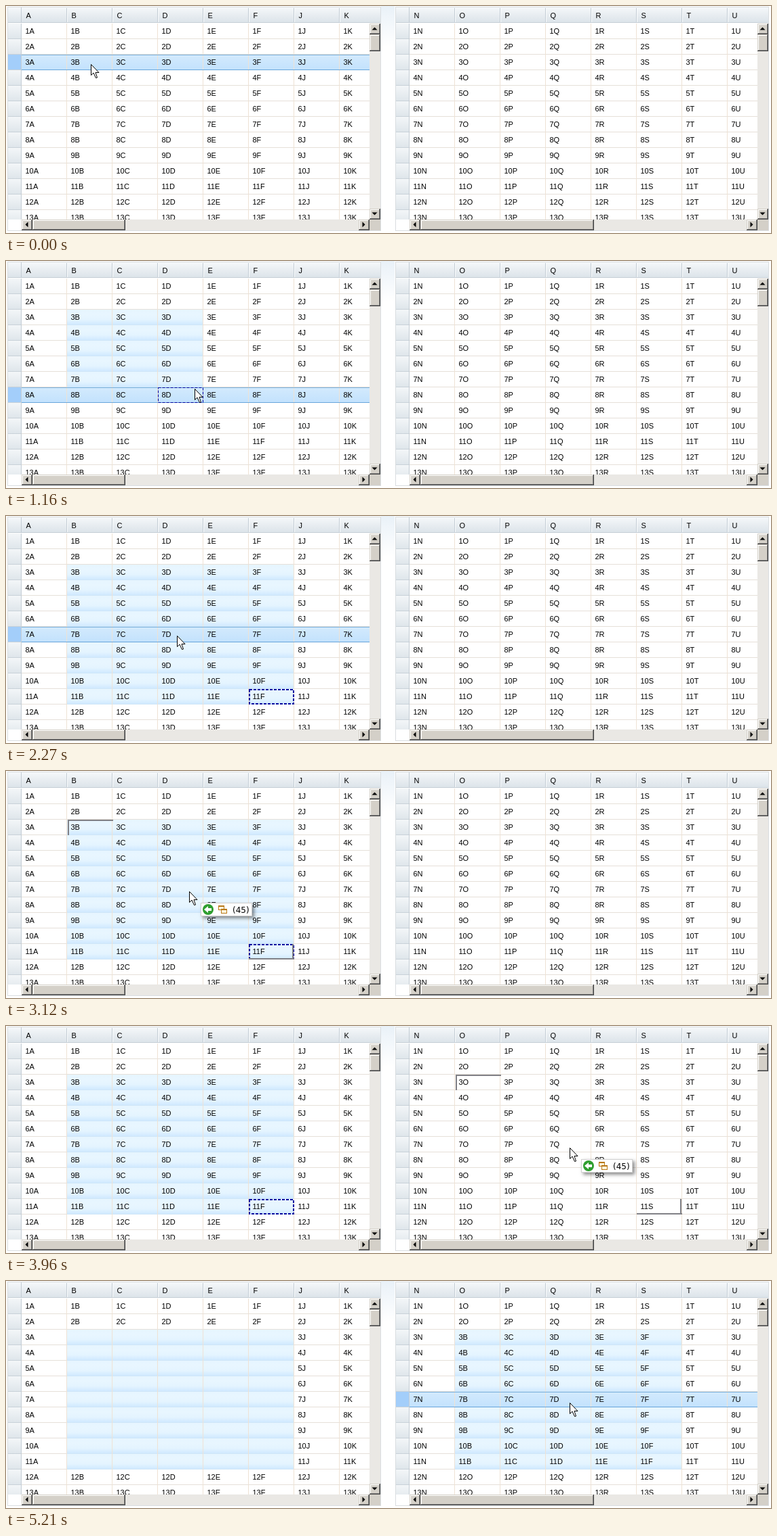
Write an HTML page with a canvas that moves like this. It is 1128 px wide and 336 px high and loops after 6610 ms.

```html
<!DOCTYPE html>
<html lang="en">
<head>
<meta charset="utf-8">
<title>Dragging cells between two grids</title>
<style>
html, body { margin: 0; width: 100%; height: 100%; overflow: hidden; background: #fff; }
canvas { display: block; }
</style>
</head>
<body>
<canvas id="stage" width="1128" height="336"></canvas>
<script>
const c = document.getElementById('stage').getContext('2d');
const LOOP = 6610, GRID_DX = 572, LEFT = 23, RIGHT = 536, TOP = 26, BOTTOM = 316;
const COL = 67, ROW = 23, ROWS = 13;
const NAMES = ['ABCDEFJK', 'NOPQRSTU'];
const THUMBS = [137, 256];
const PRESS = 730, SELECTED = 1580, GRAB = 2530, HIDE = 2790, DRAG = 3120, DROP = 4890, CLEAR = 5150, DONE = 5210;
// Pointer path: time, x, y
const PATH = [
  [680, 125, 86], [980, 190, 131], [1340, 365, 246], [1460, 414, 268], [1580, 420, 272],
  [1850, 420, 272], [2270, 252, 177], [3060, 252, 177], [3240, 305, 179], [3420, 487, 180],
  [3480, 561, 180], [3600, 680, 180], [3780, 785, 180], [3960, 831, 180]
];

const colX = i => LEFT + i * COL;
const rowY = i => TOP + i * ROW;

function rect(x, y, w, h, fill) {
  c.fillStyle = fill;
  c.fillRect(x, y, w, h);
}

function shade(x, y, w, h, ...colors) {
  const g = c.createLinearGradient(0, y, 0, y + h);
  colors.forEach((color, i) => g.addColorStop(i / (colors.length - 1), color));
  rect(x, y, w, h, g);
}

function poly(points, fill, stroke) {
  c.beginPath();
  points.forEach(([x, y]) => c.lineTo(x, y));
  c.closePath();
  c.fillStyle = fill;
  c.fill();
  if (stroke) {
    c.strokeStyle = stroke;
    c.stroke();
  }
}

function text(s, x, y, font = '11px "Liberation Sans", Arial, sans-serif') {
  c.font = font;
  c.fillStyle = '#000';
  c.fillText(s, x, y);
}

function pointer(t) {
  let i = PATH.findIndex(p => p[0] > t);
  if (i === 0) return PATH[0].slice(1);
  if (i < 0) return PATH[PATH.length - 1].slice(1);
  const [t0, x0, y0] = PATH[i - 1], [t1, x1, y1] = PATH[i];
  const k = (t - t0) / (t1 - t0);
  return [Math.round(x0 + (x1 - x0) * k), Math.round(y0 + (y1 - y0) * k)];
}

// The pointer was sampled every 60 ms, with a new phase in each movement
function sampleTime(t) {
  const phase = t < 1900 ? 20 : t < 3000 ? 50 : 0;
  return Math.floor((t - phase) / 60) * 60 + phase;
}

function cellAt([x, y]) {
  const grid = x < GRID_DX ? 0 : 1, lx = x - grid * GRID_DX;
  if (lx < LEFT || lx >= RIGHT) return null;
  return { grid, col: Math.floor((lx - LEFT) / COL), row: Math.floor((y - TOP) / ROW) };
}

function button(x, y, w, h, dir) {
  rect(x, y, w, h, '#404040');
  rect(x, y, w - 1, h - 1, '#d4d0c8');
  rect(x + 1, y + 1, w - 2, h - 2, '#808080');
  rect(x + 1, y + 1, w - 3, h - 3, '#fff');
  rect(x + 2, y + 2, w - 4, h - 4, '#d4d0c8');
  if (dir === undefined) return;
  c.save();
  c.translate(x + 7.5, y + 7.5);
  c.rotate(dir * Math.PI / 2);
  poly([[-4, 2], [0, -2], [4, 2]], '#000');
  c.restore();
}

function scrollbars(thumb) {
  const track = '#eae8e4';
  rect(RIGHT, TOP, 16, BOTTOM - TOP, track);
  button(RIGHT, TOP, 16, 16, 0);
  button(RIGHT, 42, 16, 25);
  button(RIGHT, 300, 16, 16, 2);
  rect(LEFT, BOTTOM, RIGHT - LEFT, 16, track);
  button(LEFT, BOTTOM, 16, 16, 3);
  button(39, BOTTOM, thumb, 16);
  button(520, BOTTOM, 16, 16, 1);
  rect(RIGHT, BOTTOM, 16, 16, '#d4d0c8');
}

function cellText(grid, col, row, t) {
  const moved = col >= 1 && col <= 5 && row >= 2 && row <= 10;
  if (moved && grid === 0 && t >= CLEAR) return '';
  return row + 1 + NAMES[moved && t >= DROP ? 0 : grid][col];
}

function marker(col) {
  const x = colX(col + 1) + 1, y = rowY(2), r = colX(col + 6) - 1, b = rowY(11);
  c.fillStyle = '#808086';
  c.fillRect(x, y, COL, 2);
  c.fillRect(x, y, 2, ROW);
  c.fillRect(r - COL + 1, b - 2, COL, 2);
  c.fillRect(r - 2, b - ROW, 2, ROW);
}

function focusBox({ col, row }, width) {
  c.strokeStyle = '#0000a0';
  c.lineWidth = width;
  c.setLineDash([4, 2]);
  c.strokeRect(colX(col) + width / 2, rowY(row) + width / 2, COL - width, ROW - width);
  c.setLineDash([]);
  c.lineWidth = 1;
}

function drawGrid(grid, t, s) {
  const { sel, focus, hover, shift } = s;
  c.save();
  c.translate(grid * GRID_DX, 0);
  rect(2, 1, 551, 332, '#d9dde0');
  rect(3, 2, 549, 330, '#fff');
  shade(3, 2, 549, 23, '#f5f8fa', '#e8edf1', '#dbe3e9');
  rect(3, 24, 549, 1, '#c6cfd6');
  rect(22, 2, 1, 23, '#c3ccd4');
  for (let i = 0; i < 8; i++) {
    if (i) {
      rect(colX(i) - 1, 3, 1, 21, '#c3ccd4');
      rect(colX(i), 3, 1, 21, '#fafcfd');
    }
    text(NAMES[grid][i], colX(i) + 6.5, 18);
  }

  c.save();
  c.beginPath();
  c.rect(3, 25, RIGHT - 3, BOTTOM - 25);
  c.clip();
  for (let r = 0; r < ROWS; r++) {
    const y = rowY(r), hot = hover && hover.grid === grid && hover.row === r;
    if (hot) rect(3, y, 19, 22, '#a3cefa');
    else shade(3, y, 19, 22, '#f3f6f8', '#dfe6eb');
    rect(3, y + 22, 19, 1, '#c8d1d8');
    rect(22, y, 1, ROW, '#c3ccd4');
    rect(LEFT, y + 22, RIGHT - LEFT, 1, '#e6e0d9');
    if (sel && r >= sel.r0 && r <= sel.r1) {
      const x = colX(sel.c0), w = colX(sel.c1 + 1) - x - 1;
      shade(x, y, w, 22, '#e6f5ff', '#e8f6ff', '#e4f4ff', '#d0e9ff');
      rect(x, y + 22, w, 1, '#cfe6f8');
    }
    if (hot) {
      if (t >= GRAB && t < DRAG) shade(LEFT, y, RIGHT - LEFT, 22, '#e9f5ff', '#d6ecfe');
      else {
        shade(LEFT, y, RIGHT - LEFT, 22, '#d3eafd', '#c3e2fd');
        rect(LEFT, y, RIGHT - LEFT, 1, '#78afdb');
      }
      rect(LEFT, y + 22, RIGHT - LEFT, 1, '#68a5da');
    }
    for (let i = 0; i < 8; i++) {
      if (i) rect(colX(i) - 1, y + (hot ? 1 : 0), 1, hot ? 21 : ROW, '#eee2d4');
      text(cellText(grid, i, r, t), colX(i) + 5.5, y + 15);
    }
  }
  if (focus) focusBox(focus, hover && hover.row === focus.row ? 1 : 2);
  if (shift !== null) {
    c.beginPath();
    c.rect(LEFT, TOP, RIGHT - LEFT, BOTTOM - TOP);
    c.clip();
    marker(shift);
  }
  c.restore();
  scrollbars(THUMBS[grid]);
  c.restore();
}

function windowIcon(x, y) {
  rect(x, y, 9, 7, '#b87818');
  rect(x + 1, y + 2, 7, 4, '#fff6dc');
}

function dragLabel(x, y, icons) {
  c.save();
  c.shadowColor = 'rgba(0,0,0,.45)';
  c.shadowBlur = 5;
  c.shadowOffsetX = c.shadowOffsetY = 3;
  rect(x, y, 76, 20, '#d0d0d0');
  c.restore();
  rect(x + 1, y + 1, 74, 18, '#fff');
  text('(45)', x + 47, y + 14.5, '12px "DejaVu Sans", sans-serif');
  if (!icons) return;
  c.beginPath();
  c.arc(x + 11, y + 10, 8, 0, 7);
  c.fillStyle = '#2f9e2f';
  c.fill();
  c.save();
  c.translate(x + 11, y + 10);
  poly([[-6, 0], [0, -5], [0, -2], [5, -2], [5, 2], [0, 2], [0, 5]], '#fff');
  c.restore();
  windowIcon(x + 26, y + 4);
  windowIcon(x + 30, y + 9);
}

function arrow(x, y) {
  c.save();
  c.translate(x + .5, y + .5);
  poly([[0, 0], [0, 16], [3.5, 12.5], [7, 20], [9, 19.5], [6.5, 12], [11.5, 12]], '#fff', '#000');
  c.restore();
}

function draw(t) {
  const step = sampleTime(t), pos = pointer(step), cell = cellAt(pos);
  const dragging = t >= DRAG && t < DROP;
  const anchor = cell ? pos : pointer(step - 60), target = cell || cellAt(anchor);
  const focus = t < PRESS || t >= CLEAR ? null : t < SELECTED ? cell : { col: 5, row: 10 };
  const full = { c0: 1, c1: 5, r0: 2, r1: 10 };
  const sel = t < PRESS ? null : t < SELECTED ? { ...full, c1: cell.col, r1: cell.row } : full;
  const hover = t < DRAG || t >= DONE ? cell : null;
  const shiftIn = g => dragging && target && target.grid === g ? target.col - 3 : null;

  rect(0, 0, 1128, 336, '#fff');
  shade(553, 0, 20, 60, '#e9f1f8', '#fff');
  drawGrid(0, t, { sel, focus, hover, shift: shiftIn(0) });
  drawGrid(1, t, { sel: t >= DROP ? full : null, focus: null, hover, shift: shiftIn(1) });
  if (dragging) dragLabel(anchor[0] + 17, anchor[1] + 17, !!cell);
  if (t < HIDE || t >= DRAG) arrow(...pos);
}

const start = performance.now();
function tick() {
  draw((performance.now() - start) % LOOP);
  requestAnimationFrame(tick);
}
tick();
</script>
</body>
</html>
```
